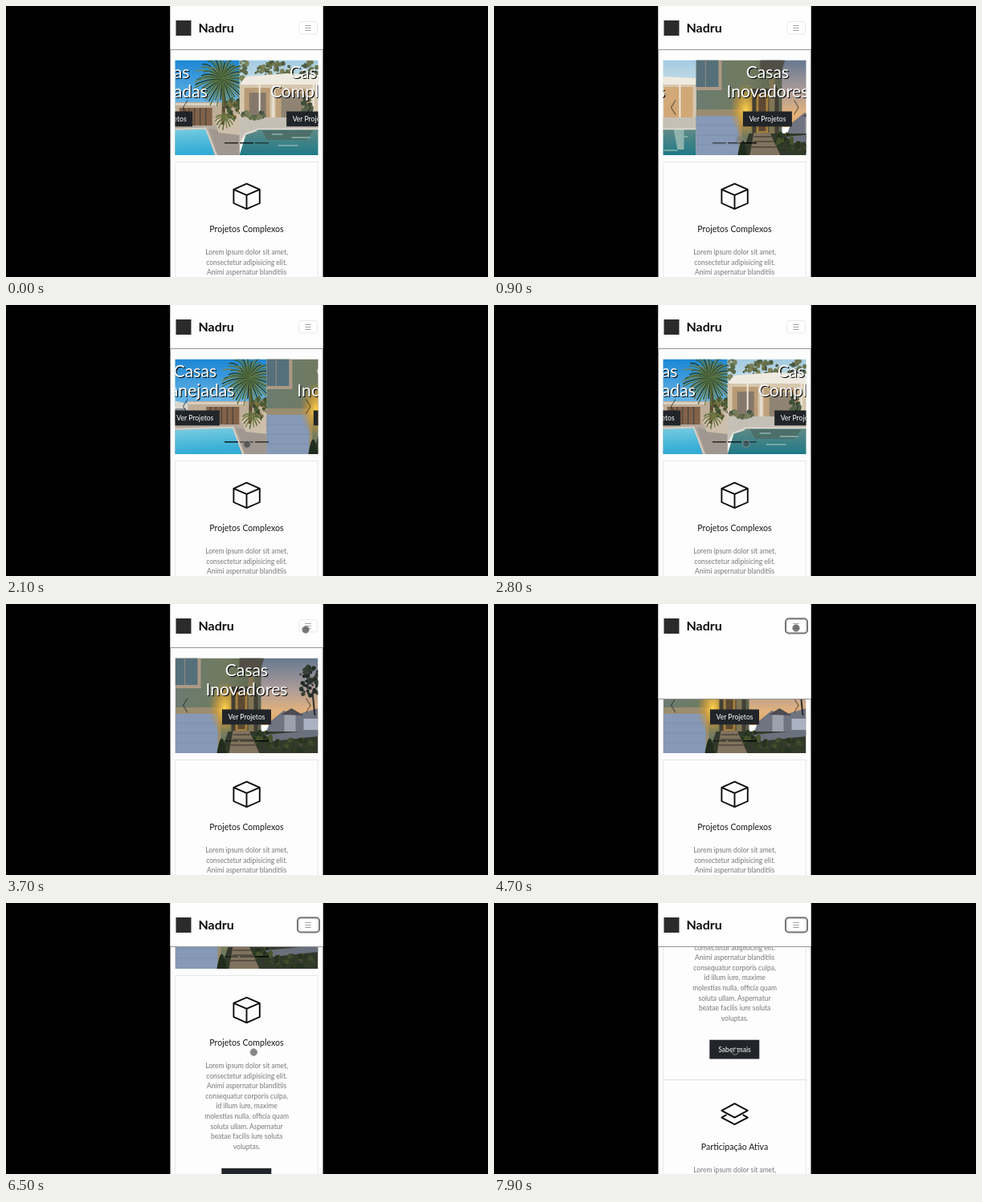
Write an HTML page that moves like this. It is 600x338 px and loops after 8 s.

```html
<!DOCTYPE html>
<html lang="pt">
<head>
<meta charset="utf-8">
<title>Projetos</title>
<style>
  html, body { margin: 0; width: 100%; height: 100%; overflow: hidden; background: #000; }
  svg { display: block; font-family: Lato, "Open Sans", sans-serif; }
  .mid { text-anchor: middle; }
  .hero { font-size: 21.2px; fill: #fff; filter: drop-shadow(1.2px 1.2px .3px #000); }
  .btn { font-size: 8.6px; fill: #fff; }
  .copy { font-size: 8.5px; fill: #74787b; }
  .title { font-size: 10.6px; fill: #16191c; }
  .icon { fill: none; stroke: #0c0c0c; stroke-width: 1.9; stroke-linejoin: round; }
</style>
</head>
<body>
<svg width="600" height="338" viewBox="0 0 600 338">
  <defs>
    <clipPath id="phone"><rect x="204.5" width="190" height="338"/></clipPath>
    <clipPath id="frame"><rect x="210.5" y="67.5" width="178" height="118.5"/></clipPath>
    <clipPath id="photo"><rect y="67.5" width="178.3" height="118.5"/></clipPath>
    <linearGradient id="day" x2="0" y2="1"><stop stop-color="#1c86d4"/><stop offset="1" stop-color="#6fb9e6"/></linearGradient>
    <linearGradient id="pale" x2="0" y2="1"><stop stop-color="#a3cbe2"/><stop offset="1" stop-color="#e6ebe8"/></linearGradient>
    <linearGradient id="dusk" x2="0" y2="1"><stop stop-color="#66788f"/><stop offset=".45" stop-color="#a99a99"/><stop offset=".8" stop-color="#e3b27c"/><stop offset="1" stop-color="#dfa862"/></linearGradient>
    <linearGradient id="pool" x2=".3" y2="1"><stop stop-color="#86d2e2"/><stop offset="1" stop-color="#35add6"/></linearGradient>
    <linearGradient id="teal" x2="0" y2="1"><stop stop-color="#5f8a86"/><stop offset="1" stop-color="#1f7a88"/></linearGradient>
    <linearGradient id="wall"><stop stop-color="#6b7c70"/><stop offset=".6" stop-color="#717a5f"/><stop offset="1" stop-color="#5c624f"/></linearGradient>
    <radialGradient id="lamp"><stop stop-color="#ffd34f"/><stop offset=".5" stop-color="#d9a236" stop-opacity=".7"/><stop offset="1" stop-color="#b98a30" stop-opacity="0"/></radialGradient>
  </defs>
  <g clip-path="url(#phone)">
    <rect x="204" width="191" height="338" fill="#fdfdfd"/>
    <g id="page">
      <g id="carousel" clip-path="url(#frame)"></g>
      <g id="cards"></g>
    </g>
    <g id="nav">
      <rect id="panel" x="204" width="191" height="54" fill="#fefefe"/>
      <rect id="rule" x="204" y="54" width="191" height="1" fill="#969696"/>
      <rect x="211.5" y="18" width="19" height="19" fill="#2b2b2b"/>
      <text x="239.5" y="32.8" font-size="16" font-weight="700" fill="#0b0b0b">Nadru</text>
      <rect x="365" y="19.5" width="22.5" height="15.5" rx="3" fill="none" stroke="#e9e9e9"/>
      <path d="M372.3 24.5h7.4m-7.4 3h7.4m-7.4 3h7.4" stroke="#999" stroke-width=".9"/>
      <rect id="ring" x="363" y="18.3" width="27" height="18.2" rx="4" fill="none" stroke="#777" stroke-width="2.1"/>
    </g>
    <circle id="touch" r="4.3" stroke="#909090"/>
  </g>
</svg>
<script>
const $ = id => document.getElementById(id);
const LOOP = 8000, W = 178, LEFT = 210.5;

const rect = (x, y, w, h, fill) => `<rect x="${x}" y="${y}" width="${w}" height="${h}" fill="${fill}"/>`;
const path = (d, fill) => `<path d="${d}" fill="${fill}"/>`;
const line = (d, color, w = 1) => `<path d="${d}" fill="none" stroke="${color}" stroke-width="${w}"/>`;
const text = (cls, x, y, s) => `<text class="mid ${cls}" x="${x}" y="${y}">${s}</text>`;

let seed = 7;
const rnd = () => (seed = (seed * 16807) % 2147483647) / 2147483647;

// Leafy clump of small circles inside an ellipse
function bush(cx, cy, rx, ry, n, colors) {
  let out = '';
  for (let i = 0; i < n; i++) {
    const a = rnd() * 6.283, k = Math.sqrt(rnd());
    out += `<circle cx="${(cx + rx * k * Math.cos(a)).toFixed(1)}" cy="${(cy + ry * k * Math.sin(a)).toFixed(1)}" r="${(1.3 + rnd() * 1.8).toFixed(1)}" fill="${colors[i % colors.length]}"/>`;
  }
  return out;
}

// Fan of drooping fronds
function palm(cx, cy, r, n, colors) {
  let out = '';
  for (let i = 0; i < n; i++) {
    const a = i / n * 6.283, len = r * (.7 + .3 * rnd());
    const x = cx + len * Math.cos(a), y = cy + len * .85 * Math.sin(a) + 4;
    const qx = cx + len * .6 * Math.cos(a), qy = cy + len * .7 * Math.sin(a) - 3;
    out += line(`M${cx} ${cy}Q${qx.toFixed(1)} ${qy.toFixed(1)} ${x.toFixed(1)} ${y.toFixed(1)}`, colors[i % colors.length], 1.5);
  }
  return out;
}

const poolHouse = () =>
  rect(0, 67, W, 60, 'url(#day)') +
  path('M0 116L62 119L84 124V152H0Z', '#d8d6cf') +
  rect(60, 129, 18, 18, '#8b9497') +
  path('M80 120H178V154H80Z', '#bfae97') +
  rect(103, 127, 41, 22, '#82624a') +
  line('M108 127v22m7-22v22m7-22v22m7-22v22m7-22v22', '#54483f', 1.6) +
  line('M80 122.5H152', '#ded5c8', 2.4) +
  rect(0, 149, W, 37, '#b3a89c') +
  path('M0 158L136 153.5L147 186H0Z', 'url(#pool)') +
  path('M140 153L178 160V186H151Z', '#a09890') +
  line('M0 156.5L136 152.5L149 186', '#d6d0c6', 2) +
  path('M146 141L178 134V161L152 158Z', '#cdbfac') +
  bush(170, 127, 10, 14, 36, ['#4b5c36', '#74683d', '#39482d']) +
  line('M157 148Q160 118 156 92', '#5a4a33', 4) +
  palm(156, 91, 37, 54, ['#3b5c34', '#5d7440', '#223f2c', '#748050']) +
  palm(160, 140, 13, 14, ['#5c6c3d', '#7d7e48']);

const complexHouse = () =>
  rect(0, 67, W, 60, 'url(#pale)') +
  bush(44, 82, 24, 12, 60, ['#67704a', '#7c8058', '#505c40']) +
  bush(88, 80, 13, 10, 25, ['#6c7550', '#4d5b42']) +
  bush(5, 82, 7, 15, 20, ['#7c8660', '#5a6a4a']) +
  rect(0, 97, W, 58, '#d6c7ae') +
  path('M8 88L58 84L178 90V98H2V95Z', '#efeae0') +
  rect(6, 102, 32, 40, '#b99c76') +
  rect(12, 108, 21, 33, '#85786a') +
  rect(45, 103, 43, 39, '#bea27b') +
  rect(52, 109, 30, 30, '#8f8473') +
  rect(104, 101, 29, 40, '#a98a66') +
  rect(138, 101, 36, 40, '#d1a876') +
  line('M25 98v45m17-46v49m50-48v47m42-47v48m24-48v46', '#efe8dc', 2) +
  rect(0, 139, W, 18, '#c5c0b6') +
  bush(18, 136, 15, 5, 26, ['#5f6b4b', '#767e5c', '#495642']) +
  bush(84, 126, 6, 13, 24, ['#3f4d3a', '#56634a']) +
  bush(108, 142, 13, 5, 16, ['#4d5b42', '#6d7953']) +
  path('M0 186L8 160L24 154H178V186Z', 'url(#teal)') +
  path('M28 155H92L84 167H34Z', '#4d6f69') +
  path('M0 156H23L7 161L0 174Z', '#c7c3ba') +
  line('M40 160h14m11 4h23m16-6h9m41 5h14M48 174h25m60 6h22', '#8db5b1', 1.4) +
  path('M150 153h13v26h-8z', '#8fb4ae') +
  line('M0 172L7 160L23 153.5H178', '#e4dfd4', 1.6);

const duskHouse = () =>
  rect(82, 67, 96, 84, 'url(#dusk)') +
  rect(0, 67, 107, 119, 'url(#wall)') +
  path('M80 67H111L106 83H80Z', '#504e45') +
  rect(0, 67, 32, 38, '#ac9985') +
  rect(0, 67, 28, 34, '#56707b') +
  line('M12 67v34', '#8a8980', 1.2) +
  rect(0, 129, 57, 57, '#9a8d70') +
  rect(0, 137, 53, 49, '#8699b6') +
  line('M0 149H53M0 161H53M0 173H53', '#788cab', .8) +
  '<ellipse cx="62" cy="130" rx="20" ry="34" fill="url(#lamp)"/>' +
  rect(70, 103, 33, 60, '#433f34') +
  rect(75, 110, 15, 48, '#a47f3d') +
  rect(78, 113, 9, 43, '#5d4933') +
  rect(91, 90, 7, 73, '#807555') +
  path('M118 147L135 133L151 138L178 130V164H112Z', '#6f7480') +
  path('M136 136L150 138V160H136Z', '#9ba1ad') +
  path('M132 138L145 130L160 139Z', '#4c4b50') +
  rect(160, 143, 18, 14, '#aab1c1') +
  path('M57 186L66 159H178V186Z', '#32392b') +
  path('M112 163L178 157V165L122 171Z', '#6a707c') +
  path('M72 158H92L105 186H67Z', '#80735f') +
  line('M72 163H94M71 169H97M69 176H100', '#4c463d', 1.5) +
  bush(168, 97, 14, 20, 62, ['#2c3430', '#384036', '#232b28']) +
  line('M171 110L174 139', '#2a2c28', 2) +
  path('M52 186Q58 149 64 186Z', '#202c1d') +
  bush(109, 168, 11, 9, 34, ['#2b3a22', '#48512d', '#1f2c1d']) +
  bush(145, 176, 31, 8, 46, ['#303c26', '#414b2e', '#273321']);

const slides = [
  ['Planejadas', poolHouse],
  ['Complexas', complexHouse],
  ['Inovadores', duskHouse]
];
const indicator = i => `<rect id="dot${i}" x="${272 + 19 * i}" y="170" width="17" height="1.6" fill="#050505"/>`;

$('carousel').innerHTML = slides.map(([name, art], i) =>
  `<g id="slide${i}"><g clip-path="url(#photo)">${art()}</g>` +
  text('hero', 89, 89.6, 'Casas') + text('hero', 89, 114.4, name) +
  rect(58.5, 131.5, 61, 18.8, '#212529') + text('btn', 89, 144.2, 'Ver Projetos') + '</g>'
).join('') +
  `<g opacity=".5">${line('M226 117.5L220.5 126.5L226 135.5M373.5 117.5L379 126.5L373.5 135.5', '#111', 1.3)}</g>` +
  [0, 1, 2].map(indicator).join('');

const copy = ['Lorem ipsum dolor sit amet,', 'consectetur adipisicing elit.',
  'Animi aspernatur blanditiis', 'consequatur corporis culpa,', 'id illum iure, maxime',
  'molestias nulla, officia quam', 'soluta ullam. Aspernatur', 'beatae facilis iure soluta', 'voluptas.'];
const cube = 'M299.5 221.7L315.8 228.8V246L299.5 253.2L283.4 246V228.8ZM283.4 228.8L299.5 235.8L315.8 228.8M299.5 235.8V253.2';
const layers = 'M299.5 224L315.8 232.7L299.5 241.4L283.4 232.7ZM289.5 238L283.4 241.4L299.5 250L315.8 241.4L309.7 238';

const card = (y, icon, title) => `<g transform="translate(0 ${y})">` +
  `<rect x="210.9" y="194.4" width="177.3" height="290" fill="none" stroke="#dedede" stroke-width=".7"/>` +
  `<path class="icon" d="${icon}"/>` + text('title', 299.5, 281.6, title) +
  copy.map((s, i) => text('copy', 299.6, (309.9 + 12.61 * i).toFixed(2), s)).join('') +
  rect(268.3, 434.7, 62, 23.8, '#212529') + text('btn', 299.5, 450, 'Saber mais') + '</g>';
$('cards').innerHTML = card(0, cube, 'Projetos Complexos') + card(290.2, layers, 'Participação Ativa');

const ease = u => .5 - .5 * Math.cos(Math.PI * Math.max(0, Math.min(1, u)));

// Rows are [time, ...values]
function track(rows, t) {
  let i = 0;
  while (i < rows.length - 2 && t >= rows[i + 1][0]) i++;
  const a = rows[i], b = rows[i + 1], k = ease((t - a[0]) / (b[0] - a[0]));
  return a.slice(1).map((v, j) => v + (b[j + 1] - v) * k);
}

// start, from, to, direction
const moves = [[-319, 0, 1, 1], [491, 1, 2, 1], [1746, 2, 0, -1], [2481, 0, 1, 1], [3090, 1, 2, 1]];
const scroll = [[6000, 0], [6700, 128], [6900, 134], [7500, 256], [7900, 264]];
const menu = [[4200, 54], [4550, 118], [5100, 118], [5450, 54]];
// x, y, fill opacity, opacity
const touch = [
  [0, 318, 176, .2, 0], [300, 318, 172, .3, .8], [500, 318, 171, .7, .9], [900, 305, 166, .2, .9],
  [1300, 284, 170, .3, .9], [1740, 281, 171, .8, .9], [2100, 300, 174, .8, .9], [2480, 300, 172, .8, .9],
  [2800, 314, 173, .6, .9], [3090, 318, 171, .8, .9], [3700, 373, 32, .8, .9], [4200, 376, 30, .8, .9],
  [5600, 376, 30, .7, .9], [6000, 310, 290, .7, .9], [6700, 308, 162, .7, .9], [6900, 302, 300, .3, .9],
  [7500, 300, 185, .7, .9], [7900, 300, 185, .25, .9]
];

function draw(t) {
  const [start, from, to, dir] = moves.filter(m => m[0] <= t).pop();
  const p = ease((t - start) / 600);
  slides.forEach((_, i) => {
    const x = i === to ? dir * (1 - p) * W : i === from ? -dir * p * W : 2 * W;
    const lit = i === to ? p : i === from ? 1 - p : 0;
    $('slide' + i).setAttribute('transform', `translate(${LEFT + x} 0)`);
    $('dot' + i).setAttribute('opacity', .5 + .5 * lit);
  });

  $('page').setAttribute('transform', `translate(0 ${-track(scroll, t)[0]})`);
  const [h] = track(menu, t);
  $('panel').setAttribute('height', h);
  $('rule').setAttribute('y', h);
  $('ring').setAttribute('opacity', ease((t - 4150) / 150));

  const [x, y, fill, alpha] = track(touch, t), c = $('touch');
  c.setAttribute('cx', x);
  c.setAttribute('cy', y);
  c.setAttribute('fill', `rgba(65,65,65,${fill})`);
  c.setAttribute('opacity', alpha);
}

const t0 = performance.now();
function tick(now) {
  draw(Math.floor(Math.max(0, now - t0) % LOOP / 100) * 100);
  requestAnimationFrame(tick);
}
draw(0);
requestAnimationFrame(tick);
</script>
</body>
</html>
```
